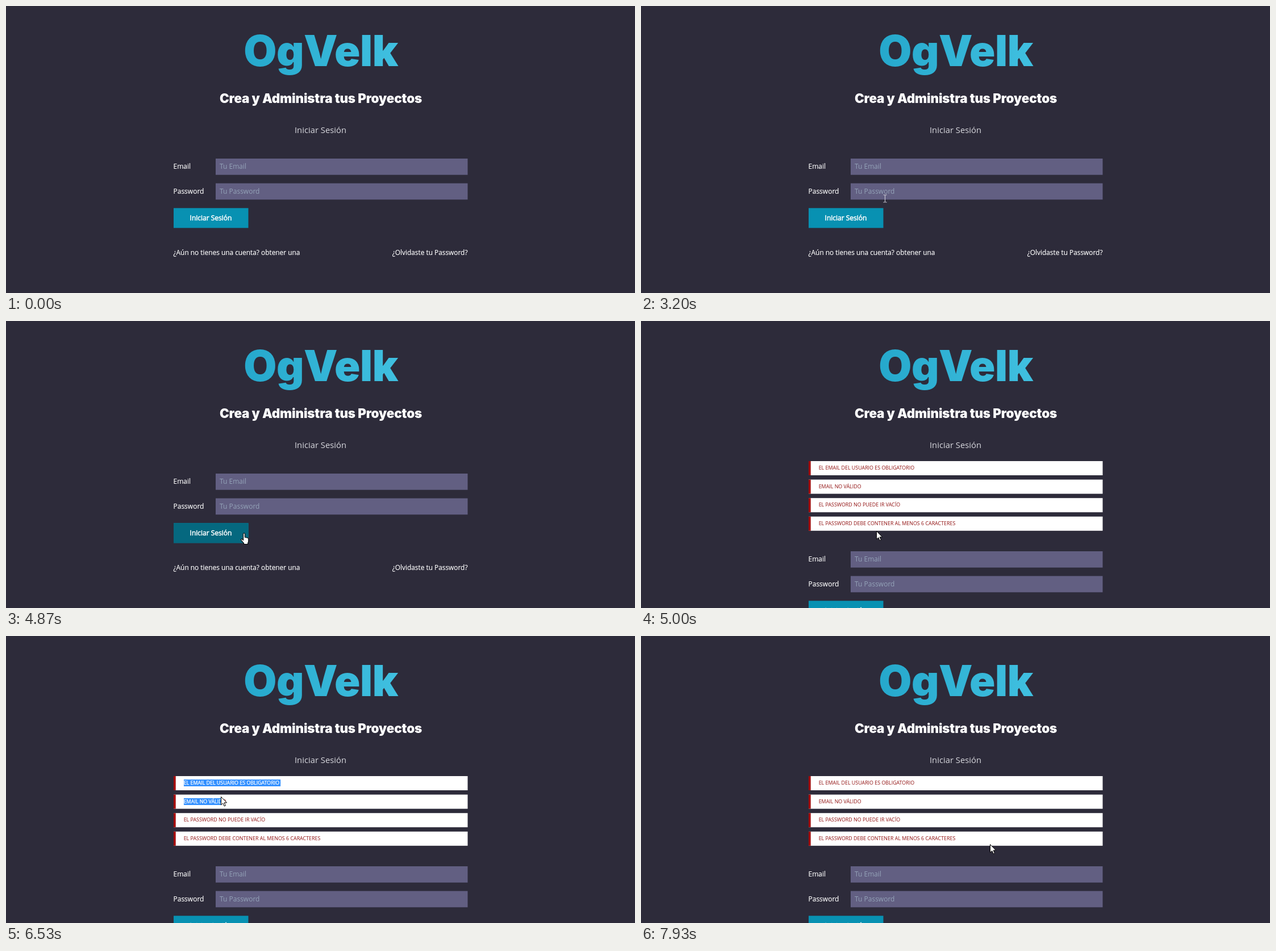
These frames come from a looping animation (1107 px wide and 506 px high, 8 s). An HTML page:

```html
<!DOCTYPE html>
<html lang="es">
<head>
<meta charset="utf-8">
<title>Iniciar Sesión</title>
<style>
  html, body { margin: 0; width: 100%; height: 100%; overflow: hidden; background: #2d2b3a; }
  svg { display: block; width: 100vw; height: 100vh; }
  text { font: 12px "Open Sans", sans-serif; fill: #fff; }
  .mid { text-anchor: middle; }
  .title, .tagline { font: 900 75px Inter, sans-serif; font-optical-sizing: none; }
  .title { fill: url(#sky); letter-spacing: -.5px; }
  .tagline { font-size: 22.5px; letter-spacing: -.2px; }
  .page { font-size: 14.8px; fill: #d8d8de; }
  .label, .link text { stroke: #fff; stroke-width: .15px; }
  .link text { font-size: 11.88px; }
  .hint { fill: #94a3b8; pointer-events: none; }
  #button text { font-size: 12px; stroke-width: .5px; }
  .field { fill: #625f82; }
  .alert text { font-size: 8.9px; fill: #900f0f; }
  .alert .picked text { fill: #fff; stroke: #fff; stroke-width: .25px; }
  .picked, #cursor { pointer-events: none; }
  .arrow, .hand { fill: #fff; stroke: #000; stroke-linejoin: round; }
  .beam { fill: none; }
</style>
</head>
<body>
<svg viewBox="0 0 1107 506">
  <defs>
    <linearGradient id="sky" gradientUnits="userSpaceOnUse" x1="418" x2="691">
      <stop offset="0" stop-color="#25a8cc"/>
      <stop offset="1" stop-color="#40c0e0"/>
    </linearGradient>
  </defs>
  <text class="title mid" x="554" y="105.5">OgVelk</text>
  <text class="tagline mid" x="554" y="171">Crea y Administra tus Proyectos</text>
  <text class="page mid" x="553.5" y="224">Iniciar Sesión</text>

  <g id="alerts"></g>

  <g id="form">
    <rect class="field" x="369" y="269" width="443.5" height="28.7"/>
    <rect class="field" x="369" y="312.6" width="443.5" height="28.7"/>
    <text class="label" x="294.5" y="287">Email</text>
    <text class="label" x="294.5" y="331">Password</text>
    <text class="hint" x="376" y="287">Tu Email</text>
    <text class="hint" x="376" y="331">Tu Password</text>
    <g id="button" class="link">
      <rect x="295" y="356.3" width="131.5" height="35" fill="#0891b2"/>
      <rect id="shade" x="295" y="356.3" width="131.5" height="35" fill="#05687f"/>
      <text class="mid" x="360.5" y="378">Iniciar Sesión</text>
    </g>
    <g class="link">
      <text x="294.5" y="439">¿Aún no tienes una cuenta? obtener una</text>
      <text x="812.5" y="439" text-anchor="end">¿Olvidaste tu Password?</text>
    </g>
  </g>

  <g id="cursor">
    <path class="arrow" d="M.5 .5V14.8L3.8 11.8 6.2 17 8.4 16 6.1 10.9H10.6Z"/>
    <path class="beam" d="M-3 -6.5H-1Q0 -6.5 0 -5.5Q0 -6.5 1 -6.5H3M0 -5.5V5.5M-3 6.5H-1Q0 6.5 0 5.5Q0 6.5 1 6.5H3"/>
    <path class="hand" transform="translate(-6.3 -.5) scale(1.08)" d="M4.5 12V1.7a1.3 1.3 0 0 1 2.6 0V7.2l4.2 .9q1.7 .4 1.7 2v3.4q0 1.5-1 3V18.5H5.5V17L1.3 12.2q-1-1.5 .4-2.1 1.2-.4 2.8 1.9z"/>
  </g>
</svg>
<script>
const LOOP = 8000, STEP = 1000 / 15;
const ENTER = 1060, HOVER = 3400, LOADED = 4930, SELECT = 6390, CLEAR = 7530;
const SHIFT = 137, TEXT_X = 312.7, ROW_TOP = 247, ROW_PITCH = 32.6;

const $ = s => document.querySelector(s);
const clamp = (v, a, b) => Math.min(b, Math.max(a, v));
const mix = (a, b, u) => a + (b - a) * u;

// Each move starts where the last one ended; an optional "via" bends it.
const entry = [1095, 494];
const moves = [
  { from: 1060, till: 1866, to: [364, 195], via: [600, -180] },
  { from: 1867, till: 2733, to: [526, 293.5], via: [700, -70] },
  { from: 2734, till: 3600, to: [395, 374], via: [408, 340] },
  { from: 3601, till: 3866, to: [396, 384] },
  { from: 4134, till: 4533, to: [419, 374] },
  { from: 4930, till: 5533, to: [320, 271], via: [400, 360] },
  { from: 5534, till: 5866, to: [316, 260] },
  { from: 6334, till: 7200, to: [586, 358] },
  { from: 7201, till: 7260, to: [607, 362] },
  { from: 7401, till: 7933, to: [614, 367] }
];

function pointerAt(t) {
  let pos = entry;
  for (const { from, till, to, via } of moves) {
    if (t < from) break;
    const u = clamp((t - from) / (till - from), 0, 1);
    pos = pos.map((p, k) => {
      const bend = via ? via[k] : (p + to[k]) / 2;
      return mix(mix(p, bend, u), mix(bend, to[k], u), u);
    });
  }
  return pos;
}

// Alert rows, each with a clipped highlighted copy of its text.
const messages = [
  "EL EMAIL DEL USUARIO ES OBLIGATORIO",
  "EMAIL NO VÁLIDO",
  "EL PASSWORD NO PUEDE IR VACÍO",
  "EL PASSWORD DEBE CONTENER AL MENOS 6 CARACTERES"
];
$("#alerts").innerHTML = messages.map((msg, i) => {
  const top = ROW_TOP + i * ROW_PITCH, base = Math.round(top + 15);
  const label = `<text x="${TEXT_X}" y="${base}">${msg}</text>`;
  const band = `x="${TEXT_X}" y="${base - 9}" height="12"`;
  return `<g class="alert">
    <rect x="295" y="${top}" width="517.5" height="25" fill="#fff"/>
    <rect x="295" y="${top}" width="3.7" height="25" fill="#a30a0a"/>
    ${label}
    <clipPath id="clip${i}"><rect ${band} width="0"/></clipPath>
    <g class="picked" clip-path="url(#clip${i})">
      <rect ${band} width="400" fill="#3390ff"/>${label}
    </g>
  </g>`;
}).join("");
const alerts = [...document.querySelectorAll(".alert")].map(g => ({
  text: g.querySelector("text"),
  clip: g.querySelector("clipPath rect")
}));

function select(on, x, y) {
  const current = clamp(Math.floor((y - ROW_TOP + 3.6) / ROW_PITCH), 0, alerts.length - 1);
  alerts.forEach(({ text, clip }, i) => {
    const full = text.getComputedTextLength();
    let w = 0;
    if (on && i < current) w = full + 2;
    else if (on && i === current) w = clamp(x - TEXT_X, 0, full);
    clip.setAttribute("width", w);
  });
}

function pointerKind(x, y) {
  const el = document.elementFromPoint(x, y);
  if (el?.closest(".link")) return "hand";
  return el?.closest("text, .field") ? "beam" : "arrow";
}

function draw(now) {
  const t = Math.floor((now % LOOP + 4) / STEP) * STEP;
  const loaded = t >= LOADED;
  const [x, y] = pointerAt(t);

  $("#alerts").style.display = loaded ? "" : "none";
  $("#form").setAttribute("transform", `translate(0 ${loaded ? SHIFT : 0})`);
  $("#shade").style.opacity = loaded ? 0 : clamp((t - HOVER) / 250, 0, 1);
  select(t >= SELECT && t < CLEAR, x, y);

  const kind = pointerKind(x, y);
  const snap = kind === "beam" ? v => Math.floor(v) + .5 : Math.round;
  $("#cursor").style.display = t < ENTER ? "none" : "";
  $("#cursor").setAttribute("transform", `translate(${snap(x)} ${snap(y)})`);
  for (const name of ["arrow", "beam", "hand"])
    $("." + name).style.display = name === kind ? "" : "none";
  $(".beam").style.stroke = loaded && y > ROW_TOP && y < 370 ? "#333" : "#d4d4dc";
}

const start = performance.now();
function tick() {
  draw(performance.now() - start);
  requestAnimationFrame(tick);
}
tick();
</script>
</body>
</html>
```
